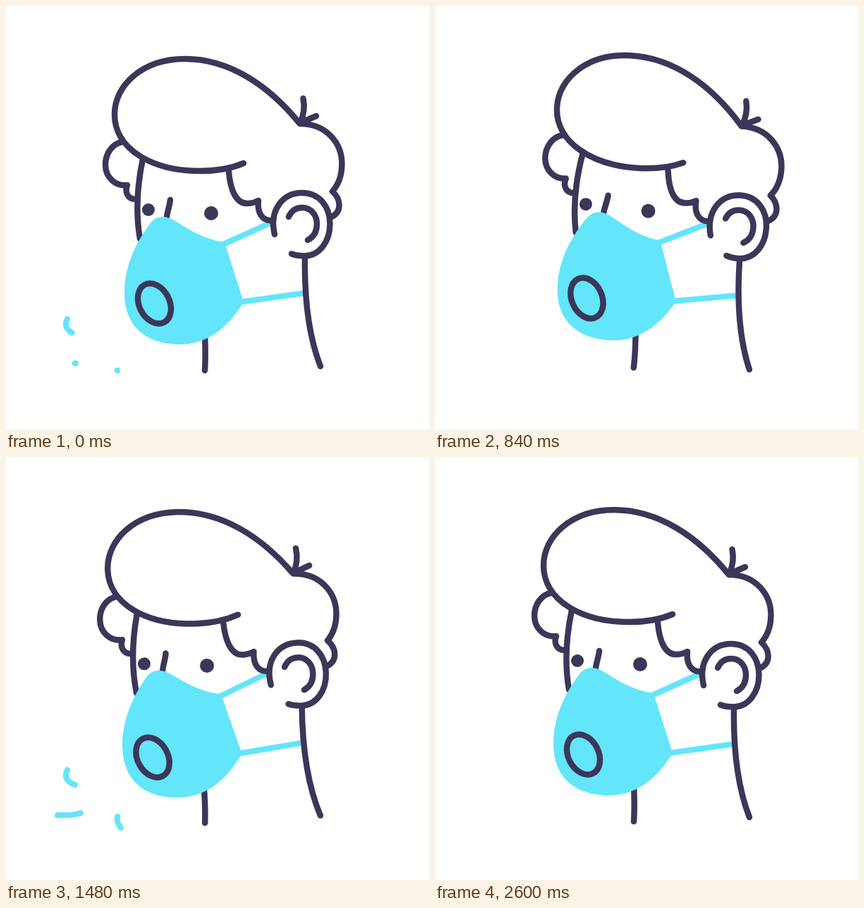
Animation, 600 px wide and 600 px high, one loop 2640 ms. Source, as an HTML page:

```html
<!DOCTYPE html>
<html lang="en">
<head>
<meta charset="utf-8">
<title>Breathing in a mask</title>
<style>
  html, body { margin: 0; width: 100%; height: 100%; overflow: hidden; background: #fff; }
  svg { display: block; width: 100%; height: 100%; }
  .ink { fill: none; stroke: #3b3759; stroke-width: 8.5; stroke-linecap: round; stroke-linejoin: round; }
  .eyes { fill: #3b3759; }
  .mask { fill: #63e5fa; }
  .straps, #air { fill: none; stroke: #63e5fa; stroke-width: 8; }
  #air { stroke-linecap: round; }
</style>
</head>
<body>
<svg viewBox="0 0 600 600">
  <g id="head">
    <g class="ink">
      <path d="M282 465C283 486 283 502 282 517"/>
      <path d="M194 217C186 255 184 295 190 330"/>
      <path d="M233 275C232 284 229 291 228 299"/>
    </g>
    <g class="eyes"><circle cx="202" cy="289" r="9"/><circle cx="291" cy="294" r="10"/></g>
    <path class="straps" d="M306 339L380 305.5M332 420L424 407"/>
    <path class="mask" d="M222 299C242 299 262 328 310 335L337 420C314 458 284 480 247 480C199 480 168 455 168 407C168 366 186 334 204 309C209 302 215 299 222 299Z"/>
    <g class="ink">
      <path d="M416 166C372 112 316 75 254 75C194 75 154 112 154 154C154 202 206 234 275 234C299 234 318 231 337 223"/>
      <path d="M421.5 131C424.5 145 422 156 417 166L440 156"/>
      <path d="M417 167C455 167 476.500 195 476.500 224C476.500 240 471 254 463 263C476 275 476 292 462 299"/>
      <path d="M316 235C318 258 325 281 343 280C350 280 354 278 358 276C356 294 364 306 379 304"/>
      <path d="M164 193C150 196 141 210 141 225C141 244 156 256 172 254C168 264 173 275 185 274"/>
      <path d="M381 324C373 290 392 265 420 265C445 265 459.500 285 459.500 309C459.500 335 444 354 424 354.500C417 354.500 411 354 405 351.500"/>
      <path d="M401 299C405 290 412 286 420 286C433 286 441 297 441 309C441 321 436 328 428 332"/>
      <path d="M424 355C423 415 430 470 446 511"/>
      <ellipse cx="210.500" cy="422" rx="21.500" ry="30" transform="rotate(-27 210.500 422)"/>
    </g>
  </g>
  <g id="air">
    <path pathLength="1" d="M155 444.500C140 456 122 466 107 466C91 466 80 456 87 444"/>
    <path pathLength="1" d="M165 462C146 485 122 506 88 508L73 508"/>
    <path pathLength="1" d="M182 479C164 494 154 510 159 520L163 526"/>
  </g>
</svg>
<script>
const LOOP = 2640, STEP = 40;
const head = document.getElementById('head');
const streams = [...document.querySelectorAll('#air path')];
// Where each stream begins when breathing in, and when
const inhale = [{ far: 1, start: -100 }, { far: 0.77, start: -20 }, { far: 0.82, start: -15 }];

const progress = (t, from, to) => Math.min(1, Math.max(0, (t - from) / (to - from)));
const smooth = (t, from, to) => { const u = progress(t, from, to); return u * u * (3 - 2 * u); };
const cubic = (t, from, to) => {
  const u = progress(t, from, to);
  return u < 0.5 ? 4 * u ** 3 : 1 - 4 * (1 - u) ** 3;
};

function drawStream(path, near, far, visible) {
  path.style.display = visible ? '' : 'none';
  path.setAttribute('stroke-dasharray', `${Math.max(0.001, far - near)} 9`);
  path.setAttribute('stroke-dashoffset', -near);
}

function render(t) {
  const tilt = 3 * cubic(t, 0, 560) - 5 * cubic(t, 840, 1725) + 2 * smooth(t, 1725, 2000);
  head.setAttribute('transform', `rotate(${tilt} 358 512)`);

  streams.forEach((path, i) => {
    if (t < 800) {
      const { far, start } = inhale[i];
      drawStream(path, far * (1 - smooth(t, start, start + 300)),
        far * (1 - smooth(t, 200, 570)), t < 560);
    } else {
      drawStream(path, smooth(t, 1240, 1620), smooth(t, 1050, 1350), t > 1050 && t < 1620);
    }
  });
}

const origin = performance.now();
function frame() {
  const t = (performance.now() - origin) % LOOP;
  render(Math.floor(t / STEP) * STEP);
  requestAnimationFrame(frame);
}
frame();
</script>
</body>
</html>
```
